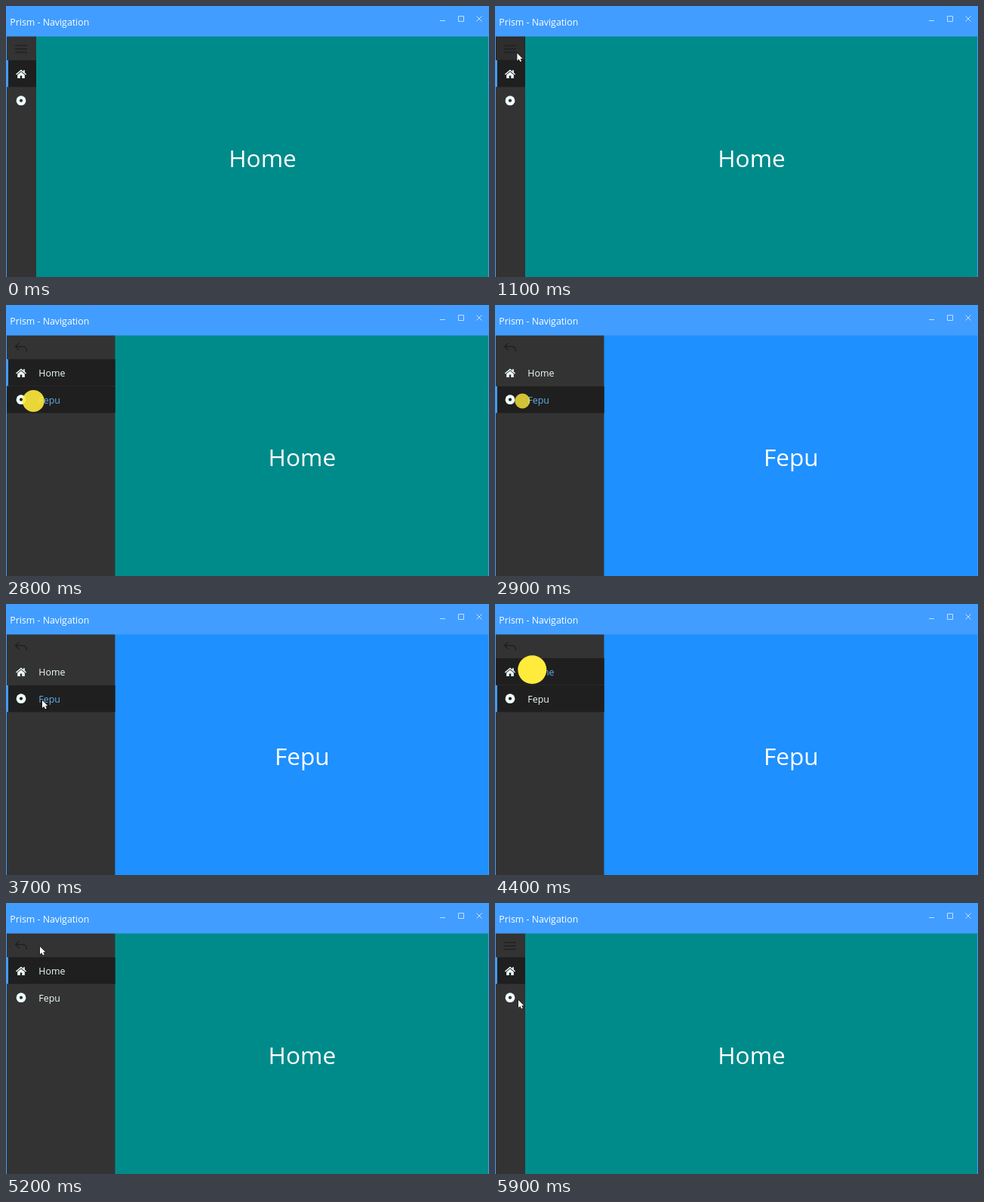
These frames come from a looping animation (640 px wide and 360 px high, 6 s). An HTML page with a canvas:

```html
<!DOCTYPE html>
<html lang="en">
<head>
<meta charset="utf-8">
<title>Navigation menu</title>
<style>
html, body { margin: 0; width: 100%; height: 100%; overflow: hidden; background: #008b8b; }
canvas { display: block; }
</style>
</head>
<body>
<canvas id="stage" width="640" height="360"></canvas>
<script>
const ctx = document.getElementById('stage').getContext('2d');
const LOOP = 6000, STEP = 100;
const ACCENT = '#419dff', PANE = '#333333', ACTIVE = '#1f1f1f', INK = '#202020', LABEL = '#f0ffff';
const PAGES = [
  { name: 'Home', color: '#008b8b', top: 72, icon: homeIcon },
  { name: 'Fepu', color: '#1e90ff', top: 108, icon: discIcon }
];

// Pointer way points: time, x, y
const PATH = [
  [100, 330, 250], [700, 110, 112], [1200, 20, 57], [1600, 18, 59], [1800, 15, 66],
  [2100, 20, 85], [2600, 36, 127], [3000, 36, 127], [3500, 48, 128], [3900, 48, 128],
  [4300, 49, 87], [4800, 49, 85], [5200, 45, 58], [5400, 20, 57], [5700, 20, 60], [5900, 31, 129]
];
const CLICKS = [1300, 2700, 4400, 5500];
const CLICK_TIME = 300;
const OPEN_AT = 1500, CLOSE_AT = 5700, SLIDE = 200;

const clamp = v => Math.max(0, Math.min(1, v));
const easeOut = v => 1 - (1 - clamp(v)) ** 3;

function pointerAt(t) {
  if (t < PATH[0][0]) return null;
  const i = PATH.findIndex(p => p[0] > t);
  if (i < 0) return { x: PATH.at(-1)[1], y: PATH.at(-1)[2] };
  const [t0, x0, y0] = PATH[i - 1], [t1, x1, y1] = PATH[i];
  const u = (t - t0) / (t1 - t0), k = u * u * (3 - 2 * u);
  return { x: x0 + (x1 - x0) * k, y: y0 + (y1 - y0) * k };
}

function rect(x, y, w, h, color) {
  ctx.fillStyle = color;
  ctx.fillRect(x, y, w, h);
}

function text(str, x, y, size, color, align = 'left') {
  ctx.font = `${size}px "Open Sans", "Noto Sans", sans-serif`;
  ctx.textAlign = align;
  ctx.fillStyle = color;
  ctx.fillText(str, x, y);
}

function disc(x, y, r, color) {
  ctx.fillStyle = color;
  ctx.beginPath();
  ctx.arc(x, y, r, 0, Math.PI * 2);
  ctx.fill();
}

function stroke(path, color, width) {
  ctx.strokeStyle = color;
  ctx.lineWidth = width;
  ctx.stroke(new Path2D(path));
}

function homeIcon() {
  stroke('M13.4 91 L20 85.5 L26.6 91', LABEL, 1.4);
  ctx.fillStyle = LABEL;
  ctx.fill(new Path2D('M15.2 91.4 L20 87.4 L24.8 91.4 V96 H21.3 V92.6 H18.7 V96 H15.2 Z M23 85.3 H24.8 V89 L23 87.5 Z'));
}

function discIcon(back) {
  disc(20, 125.7, 6.4, LABEL);
  disc(20, 125.7, 2.1, back);
}

function titleBar() {
  rect(0, 0, 640, 40.5, ACCENT);
  text('Prism - Navigation', 5.3, 26, 12.35, '#ffffff');
  const pale = '#c5e0ff';
  stroke('M575 19.5 H582', pale, 1);
  stroke('M599.5 13.5 H606.5 V20.5 H599.5 Z', pale, 1);
  stroke('M623.5 13.5 L630.5 20.5 M630.5 13.5 L623.5 20.5', pale, 1);
}

function menuButton(open, hover) {
  if (hover) {
    rect(1, 41, 39, 31.5, '#2e2e2e');
    stroke('M1.5 41 H39.5 V72 H1.5 Z', '#222222', 1);
  }
  if (open) stroke('M17.5 50.5 L12.5 55.3 L17.5 60 M12.5 55.3 H22 Q27.5 55.3 27.5 62', INK, 1.4);
  else stroke('M12 52.5 H28 M12 57 H28 M12 61.5 H28', INK, 1.3);
}

function menuItem(page, selected, hover) {
  const { top } = page, height = 35.5;
  const back = selected || hover ? ACTIVE : PANE;
  if (back === ACTIVE) rect(1, top, 145, height, ACTIVE);
  if (selected) rect(0, top, 3, height, ACCENT);
  page.icon(back);
  text(page.name, 43.3, top + 23.4, 12.4, hover ? '#64b0ea' : LABEL);
}

function pointer({ x, y }) {
  ctx.save();
  ctx.translate(x, y);
  const arrow = new Path2D('M0 0 V10 L2.4 7.9 L4 11.4 L5.8 10.6 L4.2 7.2 H7.3 Z');
  ctx.strokeStyle = '#151515';
  ctx.lineWidth = 1.2;
  ctx.stroke(arrow);
  ctx.fillStyle = '#ffffff';
  ctx.fill(arrow);
  ctx.restore();
}

function draw(t) {
  const open = t >= OPEN_AT && t < CLOSE_AT;
  const slide = t < CLOSE_AT ? easeOut((t - OPEN_AT + STEP) / SLIDE) * open
                             : 1 - easeOut((t - CLOSE_AT + STEP) / SLIDE);
  const width = 40 + 104.7 * slide;
  const current = t >= 2900 && t < 4600 ? 1 : 0;
  const page = PAGES[current];
  const pos = pointerAt(t);
  const over = (top, bottom, right) =>
    pos && t < CLOSE_AT && pos.x < right && pos.y >= top && pos.y < bottom;

  rect(0, 0, 640, 360, page.color);
  text(page.name, (width + 640) / 2, 213.5, 31.6, '#ffffff', 'center');

  ctx.save();
  ctx.beginPath();
  ctx.rect(0, 40, width, 320);
  ctx.clip();
  rect(0, 40, width, 320, PANE);
  menuButton(open, over(41, 72, 40));
  PAGES.forEach((p, i) => menuItem(p, i === current, over(p.top, p.top + 35.5, width)));
  ctx.restore();

  titleBar();
  rect(0, 40, 1, 320, ACCENT);
  rect(639, 40, 1, 320, ACCENT);

  const click = CLICKS.find(c => t >= c && t < c + CLICK_TIME);
  if (click !== undefined) {
    const age = (t - click) / STEP;
    ctx.globalAlpha = 1 - 0.1 * age;
    disc(pos.x + 0.3, pos.y + 0.5, 19 - 4.5 * age, '#ffeb3b');
    ctx.globalAlpha = 1;
  } else if (pos) pointer(pos);
}

const start = performance.now();
function tick() {
  const t = (performance.now() - start) % LOOP;
  draw(Math.floor(t / STEP) * STEP);
  requestAnimationFrame(tick);
}
tick();
</script>
</body>
</html>
```
